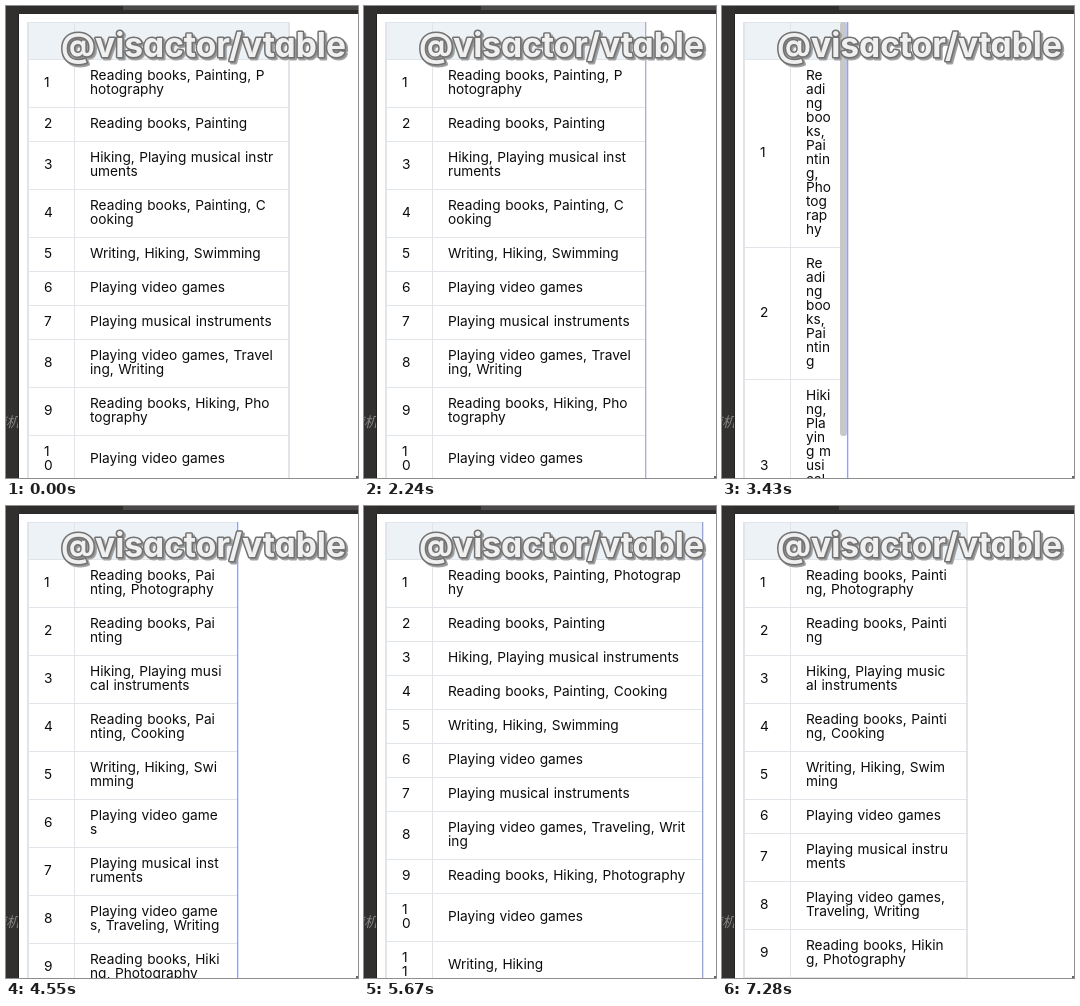
Write an HTML page with a canvas that moves like this. It is 352 px wide and 472 px high and loops after 8.26 s.

```html
<!DOCTYPE html>
<html lang="en">
<head>
<meta charset="utf-8">
<title>Column resize</title>
<style>
  html, body { margin: 0; width: 100%; height: 100%; overflow: hidden; background: #fff; }
  canvas, svg { position: absolute; left: 0; top: 0; width: 352px; height: 472px; }
  text {
    font: 700 32px Inter, sans-serif;
    font-feature-settings: "cv11";
    paint-order: stroke;
    stroke-linejoin: round;
    stroke-width: 3px;
  }
  .shadow { fill: #8e8e8e; stroke: #a2a2a2; }
  .face { fill: #f0f0f0; stroke: #727272; }
</style>
</head>
<body>
<canvas id="stage" width="352" height="472"></canvas>
<svg viewBox="0 0 352 472">
  <text class="shadow" x="57" y="52.5">@visactor/vtable</text>
  <text class="face" x="55" y="50.5">@visactor/vtable</text>
</svg>
<script>
const ctx = document.getElementById('stage').getContext('2d');
const LOOP = 8260, TICK = 70;
const LINE = 14, PAD = 10, TEXT_X = 84, EM = 13.55;
const GRID = '#e1e4e8';

const rows = [
  'Reading books, Painting, Photography',
  'Reading books, Painting',
  'Hiking, Playing musical instruments',
  'Reading books, Painting, Cooking',
  'Writing, Hiking, Swimming',
  'Playing video games',
  'Playing musical instruments',
  'Playing video games, Traveling, Writing',
  'Reading books, Hiking, Photography',
  'Playing video games',
  'Writing, Hiking'
];

// Advance widths in em, used to break lines at any character.
const advance = {};
[['il', .24], [',', .29], [' ', .32], ['t', .364], ['r', .37], ['s', .527],
 ['v', .54], ['k', .55], ['yT', .56], ['a', .57], ['c', .573], ['h', .585],
 ['nu', .59], ['oe', .6], ['bdp', .612], ['g', .62], ['P', .63], ['S', .635],
 ['R', .7], ['C', .73], ['H', .744], ['w', .818], ['m', .876], ['W', .986]
].forEach(([chars, w]) => { for (const c of chars) advance[c] = w; });

// Right edge of the column: [time, x]
const drag = [
  [0, 281.7], [1889, 281.7], [1890, 281.25], [2240, 281.25], [2870, 173],
  [3150, 140], [3430, 124.8], [3920, 124.8], [4200, 171], [4550, 231],
  [4760, 260], [5110, 316], [5600, 336], [5880, 342], [6160, 342],
  [6370, 307], [6650, 270], [7000, 244.4], [LOOP, 244.4]
];

// Colour of the resize line: [start, colour]
const tints = [
  [0, null], [1890, '#b2b1c4'], [2310, '#8fa4ee'],
  [6230, '#b2b1c4'], [6510, '#8fa4ee'], [7280, null]
];

function edgeAt(t) {
  const i = drag.findIndex(k => k[0] > t);
  const [t0, x0] = drag[i - 1], [t1, x1] = drag[i];
  return x0 + (x1 - x0) * (t - t0) / (t1 - t0);
}

function wrap(text, room) {
  const lines = [''];
  let used = 0;
  for (const c of text) {
    const w = advance[c] * EM;
    if (used + w > room && used > 0) {
      lines.push('');
      used = 0;
    }
    lines[lines.length - 1] += c;
    used += w;
  }
  return lines;
}

function box(x, y, w, h, color) {
  ctx.fillStyle = color;
  ctx.fillRect(x, y, w, h);
}

function cell(lines, x, top, height) {
  const y = top + (height - lines.length * LINE) / 2 + 11;
  lines.forEach((s, i) => ctx.fillText(s, x, y + i * LINE));
}

function drawPage() {
  box(0, 0, 352, 472, '#fff');
  box(0, 0, 352, 8, '#2f2d2c');
  box(117, 0, 235, 4, '#4a4848');
  box(0, 0, 13, 472, '#32302f');
  box(12, 8, 1, 464, '#222120');
  box(350, 470, 2, 2, '#666');
  ctx.save();
  ctx.beginPath();
  ctx.rect(0, 400, 12, 30);
  ctx.clip();
  ctx.font = 'italic 14px "Noto Sans CJK SC", "Noto Sans CJK", sans-serif';
  ctx.fillStyle = '#858382';
  ctx.fillText('随机', -14, 421);
  ctx.restore();
}

function drawTable(edge, t) {
  const right = Math.round(edge);
  box(22, 16, right - 21, 37, '#ecf2f6');
  box(22, 53, right - 22, 1, GRID);
  ctx.font = '13.7px Inter, sans-serif';
  ctx.wordSpacing = '0.7px';
  let top = 53;
  for (let i = 0; i < rows.length && top < 472; i++) {
    const lines = wrap(rows[i], edge - TEXT_X - 16);
    const index = [...String(i + 1)];
    const height = Math.max(lines.length, index.length) * LINE + 2 * PAD;
    ctx.fillStyle = '#0c0c0c';
    cell(index, 38, top, height);
    cell(lines, TEXT_X, top, height);
    top += height;
    box(22, top, right - 22, 1, GRID);
  }
  box(68, 16, 1, 456, GRID);
  box(21, 16, 2, 456, GRID);
  box(21, 16, right - 19, 1, GRID);
  box(right, 16, 2, 456, GRID);

  if (t >= 3290 && t < 3570) {
    ctx.fillStyle = '#c8c8c8';
    ctx.beginPath();
    ctx.roundRect(right - 7, 16, 7, 414, 3);
    ctx.fill();
  }
  const tint = tints.filter(k => k[0] <= t).pop()[1];
  if (tint) {
    box(right, 16, 1, 456, tint);
    box(right + 1, 16, 1, 456, '#dfe2f3');
  }
}

function fitCaption(width) {
  const labels = document.querySelectorAll('text');
  const size = 32 * width / labels[0].getComputedTextLength();
  labels.forEach(label => { label.style.fontSize = size + 'px'; });
}

function frame() {
  const t = Math.floor(performance.now() % LOOP / TICK) * TICK;
  drawPage();
  drawTable(edgeAt(t), t);
  requestAnimationFrame(frame);
}
fitCaption(285);
frame();
</script>
</body>
</html>
```
